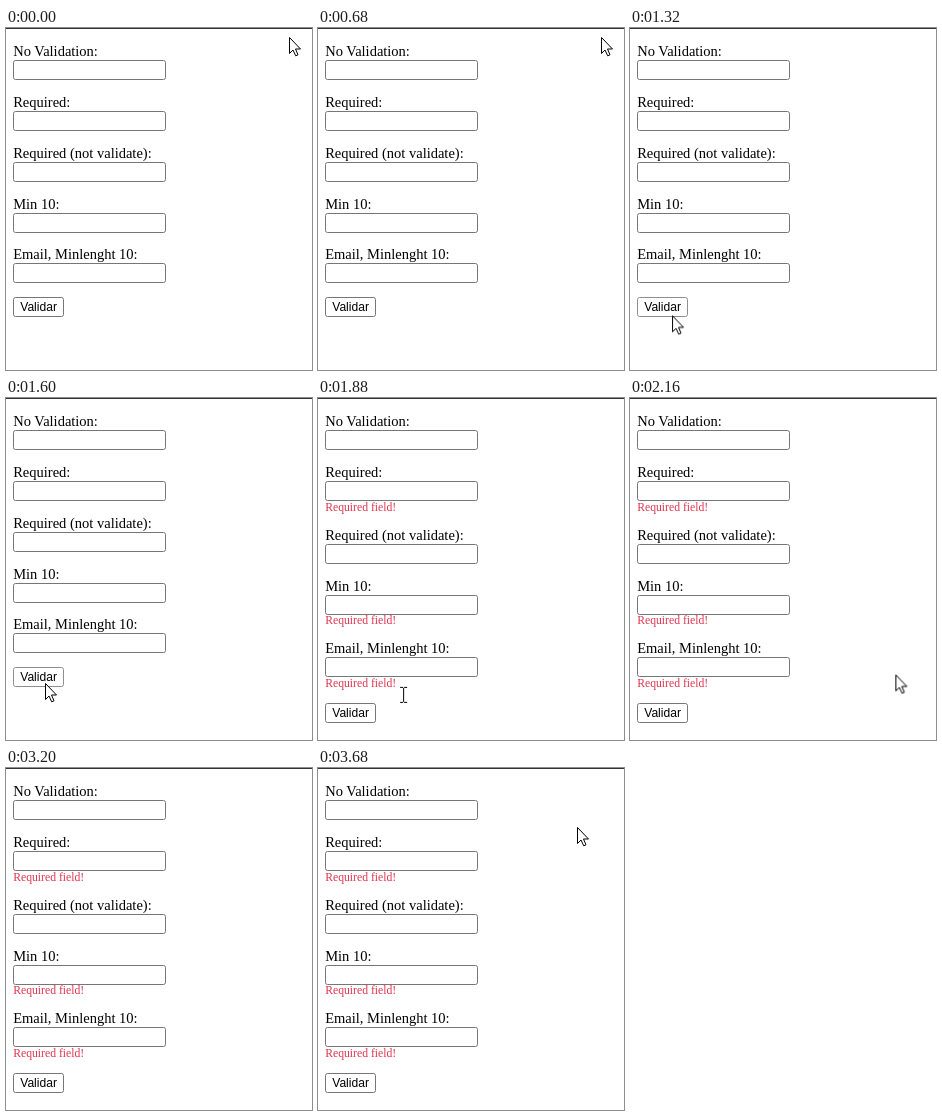
An HTML page for the animation above (3720 ms loop, 306 by 342 pixels).

```html
<!DOCTYPE html>
<html lang="en">
<head>
<meta charset="utf-8">
<title>Form validation</title>
<style>
  html, body { margin: 0; width: 100%; height: 100%; overflow: hidden; background: #fff; }
  svg { display: block; width: 306px; height: 342px; }
  text { font: 14.5px "Liberation Serif", Times, serif; }
  .box { fill: #fff; stroke: #767676; }
  .error { font-size: 11.7px; fill: #e0354f; }
  .caption { font: 12.1px "Liberation Sans", Arial, sans-serif; text-anchor: middle; }

  .row, .error, .button, .arrow, .beam, .pointer { animation: 3720ms step-end infinite; }
  .row { animation-name: shift; }
  .error { animation-name: reveal; }
  .button { animation-name: hover; }
  .arrow { animation-name: arrow; }
  .beam { animation-name: beam; }
  .pointer { animation-name: travel; animation-timing-function: linear; }

  /* Validation result pushes the rows down */
  @keyframes shift {
    0% { transform: none; }
    46.24%, 100% { transform: translateY(var(--drop, 0px)); }
  }
  @keyframes reveal {
    0% { opacity: 0; }
    46.24%, 100% { opacity: 1; }
  }
  @keyframes hover {
    0% { stroke: #767676; }
    32.26% { stroke: #8d8d95; }
    48.38%, 100% { stroke: #767676; }
  }

  /* Pointer shape and path */
  @keyframes arrow {
    0% { opacity: 1; }
    49.46% { opacity: 0; }
    52.15% { opacity: 1; }
    86.02% { opacity: 0; }
    92.47%, 100% { opacity: 1; }
  }
  @keyframes beam {
    0% { opacity: 0; }
    49.46% { opacity: 1; }
    52.15%, 100% { opacity: 0; }
  }
  @keyframes travel {
    0% { transform: translate(283px, 9px); }
    18.28% { transform: translate(283px, 9px); animation-timing-function: cubic-bezier(.4, 0, .8, .75); }
    27.96% { transform: translate(133px, 185px); animation-timing-function: cubic-bezier(.2, .4, .5, 1); }
    32.26% { transform: translate(48px, 292px); animation-timing-function: ease-out; }
    39% { transform: translate(39px, 285px); }
    47.31% { transform: translate(39px, 285px); animation-timing-function: ease-in; }
    50.54% { transform: translate(84px, 297px); animation-timing-function: cubic-bezier(.2, .5, .5, 1); }
    61.29% { transform: translate(278px, 275px); animation-timing-function: ease-out; }
    70.97% { transform: translate(286px, 273px); }
    81.72% { transform: translate(286px, 273px); animation-timing-function: ease-in; }
    86.02% { transform: translate(289px, 272px); animation-timing-function: step-end; }
    92.47% { transform: translate(285px, 72px); animation-timing-function: ease-out; }
    98.92%, 100% { transform: translate(259px, 59px); }
  }
</style>
</head>
<body>
<svg viewBox="0 0 306 342">
  <defs>
    <rect id="field" class="box" x="7.5" y="32.5" width="152" height="19" rx="2"/>
  </defs>
  <rect width="306" height="1" fill="#333"/>

  <g>
    <text x="7.2" y="28">No Validation:</text>
    <use href="#field"/>
  </g>
  <g transform="translate(0 51)">
    <text x="7.2" y="28">Required:</text>
    <use href="#field"/>
    <text class="error" x="7.2" y="62">Required field!</text>
  </g>
  <g transform="translate(0 102)">
    <g class="row" style="--drop: 12px">
      <text x="7.2" y="28">Required (not validate):</text>
      <use href="#field"/>
    </g>
  </g>
  <g transform="translate(0 153)">
    <g class="row" style="--drop: 12px">
      <text x="7.2" y="28">Min 10:</text>
      <use href="#field"/>
      <text class="error" x="7.2" y="61">Required field!</text>
    </g>
  </g>
  <g transform="translate(0 203)">
    <g class="row" style="--drop: 24px">
      <text x="7.2" y="28">Email, Minlenght 10:</text>
      <use href="#field"/>
      <text class="error" x="7.2" y="62">Required field!</text>
    </g>
  </g>
  <g class="row" style="--drop: 36px">
    <rect class="box button" x="7.5" y="269.5" width="50" height="19" rx="2"/>
    <text class="caption" x="32.6" y="283">Validar</text>
  </g>

  <g class="pointer">
    <path class="arrow" fill="#fff" stroke="#000" d="M.5 .5V16.5L4 13L6.7 18.8L9 17.8L6.5 12H11.5Z"/>
    <path class="beam" fill="none" stroke="#000" d="M-3 -7.5H0M1 -7.5H4M.5 -7V7M-3 7.5H0M1 7.5H4"/>
  </g>
</svg>
</body>
</html>
```
